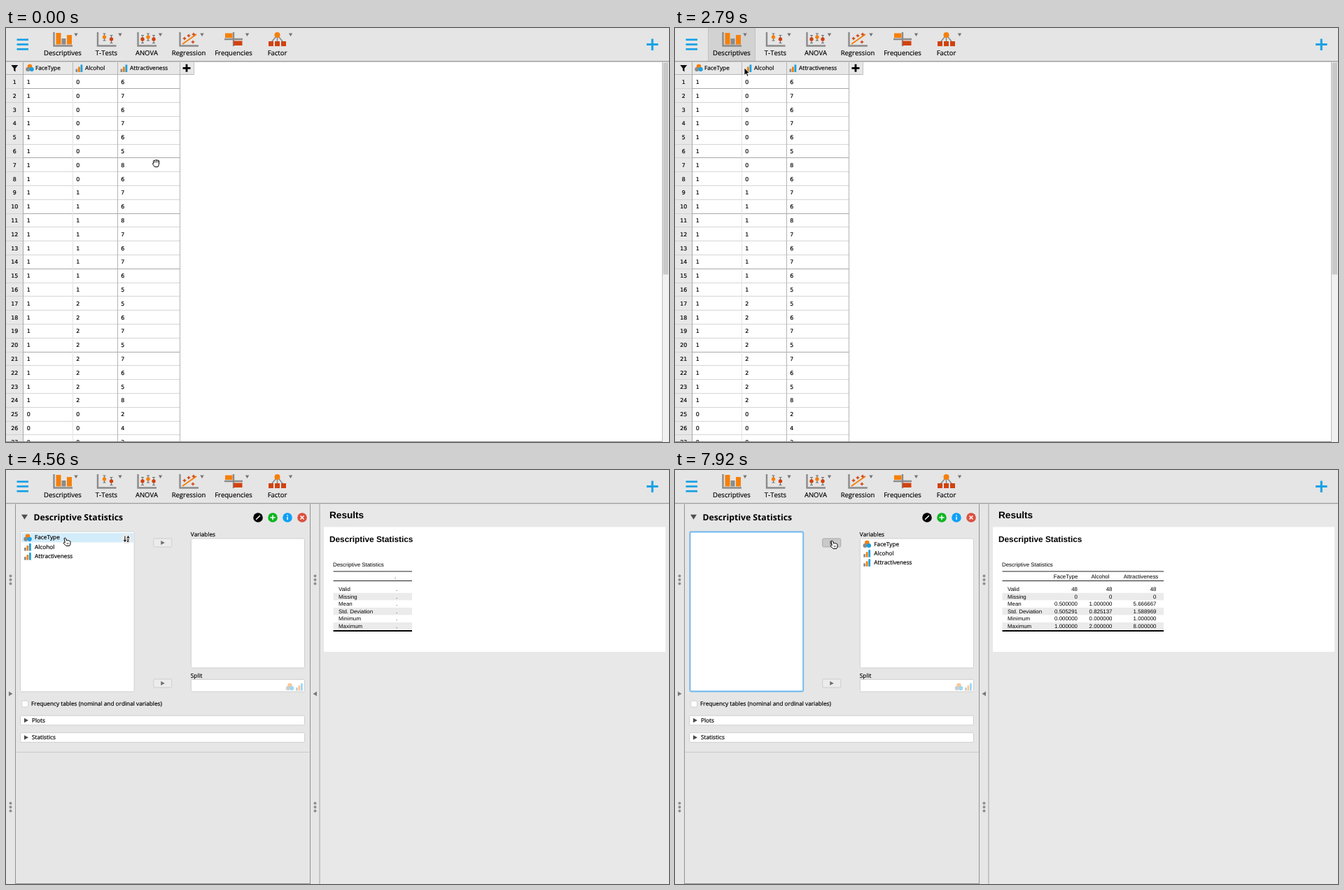
Recreate the animation shown at these times as an HTML page. Size 947x592 px, loop 8 s.

```html
<!DOCTYPE html>
<html lang="en">
<head>
<meta charset="utf-8">
<title>Descriptive statistics</title>
<style>
html, body { margin: 0; width: 100%; height: 100%; overflow: hidden; background: #fff; }
svg { display: block; width: 947px; height: 592px; }
text { font: 8.25px "Open Sans", "Noto Sans", sans-serif; font-kerning: none; stroke-width: .18px; text-rendering: geometricPrecision; white-space: pre; }
.tool { font-size: 9.5px; }
.num { font: 7.9px "DejaVu Sans", sans-serif; }
.title { font-size: 12.2px; font-weight: 700; stroke-width: 0; }
.out { font: 7.9px "Liberation Sans", Arial, sans-serif; stroke-width: 0; }
.out.h1 { font-size: 13.6px; font-weight: 700; }
.out.h2 { font-size: 11.8px; font-weight: 700; }
.sort { font-size: 5px; font-weight: 700; }
</style>
</head>
<body>
<svg viewBox="0 0 947 592">
  <g id="sheet"></g>
  <g id="results"></g>
  <g id="panel"></g>
  <g id="bar"></g>
  <g id="cursor"></g>
</svg>
<script>
const LOOP = 8000;
const ORANGE = '#f5800a', RED = '#d1420f', BLUE = '#17a1e6', GREY = '#8b8b8b';

const rect = (x, y, w, h, fill, more = '') =>
  `<rect x="${x}" y="${y}" width="${w}" height="${h}" fill="${fill}" ${more}/>`;
const line = (x1, y1, x2, y2, color, width = 1) =>
  `<path d="M${x1} ${y1}L${x2} ${y2}" stroke="${color}" stroke-width="${width}"/>`;
const path = (d, fill, more = '') => `<path d="${d}" fill="${fill}" ${more}/>`;
const stroke = (d, color, width) => path(d, 'none', `stroke="${color}" stroke-width="${width}"`);
const dot = (x, y, r, fill) => `<circle cx="${x}" cy="${y}" r="${r}" fill="${fill}"/>`;
const text = (x, y, s, cls = '', anchor = 'start', color = '#000') =>
  `<text x="${x}" y="${y}" class="${cls}" text-anchor="${anchor}" fill="${color}" stroke="${color}">${s}</text>`;
const at = (x, y, body, more = '') => `<g transform="translate(${x} ${y})" ${more}>${body}</g>`;

const layers = {};
function put(id, html) {
  if (layers[id] === html) return;
  layers[id] = html;
  document.getElementById(id).innerHTML = html;
}

// Interpolation through [time, value] pairs
function track(t, keys, ease = k => k) {
  if (t <= keys[0][0]) return keys[0][1];
  for (let i = 1; i < keys.length; i++) {
    const [a, u] = keys[i - 1], [b, v] = keys[i];
    if (t < b) return u + (v - u) * ease((t - a) / (b - a));
  }
  return keys[keys.length - 1][1];
}
const smooth = k => k * k * (3 - 2 * k);

const nominal = dot(0, -2, 3.3, ORANGE) + dot(-2.7, 2, 3.1, GREY) + dot(2.7, 2, 3.1, BLUE);
const ordinal = rect(-5, 1, 2.8, 4.5, GREY) + rect(-1.5, -2, 2.8, 7.5, ORANGE) + rect(2, -5, 2.8, 10.5, BLUE);
const variables = [['FaceType', nominal], ['Alcohol', ordinal], ['Attractiveness', ordinal]];

// ---- toolbar ----
const axes = stroke('M-12.5 -10V9.5H14', GREY, 2.4);
const whisker = (x, y, len, color) =>
  stroke(`M${x} ${y - len}V${y + len}M${x - 2} ${y - len}h4M${x - 2} ${y + len}h4`, '#6d6d6d', 1.1) + dot(x, y, 2.7, color);
const cross = (x, y) => stroke(`M${x - 2.3} ${y}h4.6M${x} ${y - 2.3}v4.6`, RED, 1.4);

const tools = [
  ['Descriptives', 81, 100, axes + rect(-9.5, -9, 7, 16.5, ORANGE) + rect(-1.5, -1, 6, 8.5, GREY) + rect(6, -6, 7, 13.5, ORANGE)],
  ['T-Tests', 143.5, 163, axes + whisker(-3, -3, 5, ORANGE) + whisker(7, 0, 5.5, RED)],
  ['ANOVA', 201, 220.5, axes + whisker(-6, 0, 5.5, RED) + whisker(2, -3, 5, ORANGE) + whisker(10, 0, 5.5, RED)],
  ['Regression', 261, 280, axes + line(-9, 7, 11, -7, ORANGE, 2) + cross(-6, -1) + cross(0, -5) + cross(7, -7) + cross(6, 4)],
  ['Frequencies', 325, 344.5, stroke('M0 -10V10M-13 0H13', GREY, 2.4) + rect(-12, -8.5, 10.5, 6.5, ORANGE) + rect(0, 2.5, 12.5, 6.5, RED)],
  ['Factor', 387.5, 406.5, stroke('M0 -6V5M0 -6L-9 5M0 -6L9 5', GREY, 1.6) + dot(0, -6, 4, ORANGE) +
    [-12.5, -3.5, 5.5].map(x => rect(x, 3, 7, 7, RED)).join('')]
];

function drawBar(hover) {
  let s = rect(0, 0, 947, 47.5, '#e5e5e5');
  if (hover) s += rect(47.5, 0, 67, 47, '#d2d2d2') + line(47.5, 0, 47.5, 47, '#c2c2c2') + line(114.5, 0, 114.5, 47, '#c2c2c2');
  s += line(0, 47.5, 947, 47.5, '#9f9f9f') + line(0, 48.5, 947, 48.5, '#cfcfcf');
  for (const y of [16.7, 23.5, 30.3]) s += line(15.5, y, 32, y, BLUE, 2.7);
  s += stroke('M915 23.6h16.5M923.2 15.4v16.5', BLUE, 3);
  for (const [name, x, arrow, icon] of tools) {
    s += at(x, 16, icon) + text(x, 38.5, name, 'tool', 'middle');
    s += path(`M${arrow - 2.7} 7.5h5.4l-2.7 4.5z`, '#747474');
  }
  return s;
}

// ---- data sheet ----
function drawSheet() {
  const scores = '676765867687676556757658243', step = 19.8;
  const strong = [1, 6, 10, 14, 20];
  let s = rect(0, 48, 947, 544, '#fff') + rect(0, 48, 269, 19, '#e8e8e8') + rect(0, 48, 25, 544, '#e8e8e8');
  for (let r = 1; r <= 27; r++) {
    const base = 60.1 + r * step, edge = Math.floor(67 + r * step) + 0.5;
    s += line(0, edge, 25, edge, '#d0d0d0') + line(25, edge, 248, edge, strong.includes(r) ? '#a9a9a9' : '#d6d6d6');
    s += text(12.3, base, r, 'num', 'middle') + text(29.8, base, r < 25 ? 1 : 0, 'num');
    s += text(100.3, base, Math.floor((r - 1) / 8) % 3, 'num') + text(164.3, base, scores[r - 1], 'num');
  }
  s += line(0, 66.5, 269, 66.5, '#b5b5b5') + line(24.5, 48, 24.5, 592, '#a9a9a9');
  s += line(95.5, 67, 95.5, 592, '#e4e4e4') + line(95.5, 48, 95.5, 67, '#bbb');
  s += line(159.5, 48, 159.5, 592, '#b4b4b4') + line(248.5, 48, 248.5, 592, '#b4b4b4') + line(268.5, 48, 268.5, 67, '#c4c4c4');
  s += path('M7.3 53h10l-3.8 4.8v4.7l-2.4-1.7v-3z', '#111');
  s += at(34, 57, nominal) + at(104.5, 57.5, ordinal) + at(168.5, 57.5, ordinal);
  [42, 113, 177].forEach((x, i) => s += text(x, 60, variables[i][0]));
  s += stroke('M252.5 57.3h11M258 51.8v11', '#000', 2.8);
  s += rect(937, 48, 10, 544, '#f1f1f1') + line(937.5, 48, 937.5, 592, '#bdbdbd') + rect(938.5, 49.5, 7.5, 303, '#c9c9c9');
  return s + line(0, 591.5, 937, 591.5, '#8f8f8f');
}

// ---- analysis panel ----
function grips(x, dir) {
  let s = '';
  for (const c of [157, 482])
    for (const d of [-5.5, 0, 5.5]) s += dot(x, c + d, 2, '#8f8f8f');
  return s + path(`M${x - 2.5 * dir} 316.8v6.4l${5.5 * dir} -3.2z`, '#777');
}

function items(list, x, y, right, hover, selected) {
  return list.map(([name, icon], i) => {
    const cy = y + i * 13.2, on = selected && i === 0;
    let s = '';
    if (i === 0 && (on || hover)) s += rect(x + 1, cy - 6.6, right - x - 2, 13.2, on ? '#0a66d6' : '#d2ecfa');
    return s + at(x + 10, cy, icon) + text(x + 20, cy + 2.6, name, '', 'start', on ? '#fff' : '#000');
  }).join('');
}

function moveButton(x, y, hot) {
  return rect(x - 13, y - 6, 26, 12, hot ? '#c9c9c9' : '#ececec', `rx="1.5" stroke="${hot ? '#a9a9a9' : '#cdcdcd'}"`) +
    path(`M${x - 2.5} ${y - 3}v6l5.5 -3z`, '#707070');
}

function drawPanel(p) {
  const { w, h, moved } = p, right = w - 8.5, span = right - 21;
  const listEnd = 21 + span * 0.4, boxX = 21 + span * 0.6, mid = 21 + span / 2;
  const box = (x, y, x2, y2) => rect(x, y, x2 - x, y2 - y, '#fff', 'rx="1.5" stroke="#cfcfcf"');

  let form = box(20.5, 88, listEnd, 317);
  form += items(variables.slice(moved), 21, 96.8, listEnd, p.hover, p.selected);
  if (p.selected) form += rect(21.5, 88.5, listEnd - 21.5, 228, 'none', 'rx="1.5" stroke="#6cb9f2" stroke-width="1.8"');
  if (moved < 3) {
    const x = listEnd - 11;
    form += dot(x, 98.5, 7.3, '#ececec') + stroke(`M${x - 2.3} 94.5v7.5m-1.8 -2l1.8 2.2l1.8 -2.2`, '#111', 1.1) +
      text(x + 0.5, 98.3, 'A', 'sort') + text(x + 0.5, 103, 'Z', 'sort');
  }
  form += moveButton(mid, 104, p.hot) + moveButton(mid, 305, false);
  form += text(boxX - 0.5, 95, 'Variables') + box(boxX, 98, right, 283);
  form += items(variables.slice(0, moved), boxX, 106, right, false, false);
  form += text(boxX - 0.5, 296.5, 'Split') + box(boxX, 299.5, right, 317);
  form += at(right - 21, 310, nominal, 'opacity=".42"') + at(right - 7.5, 310, ordinal, 'opacity=".42"');
  form += rect(22.7, 330, 9, 9, '#fff', 'rx="2" stroke="#cfcfcf"');
  form += text(36, 337.4, 'Frequency tables (nominal and ordinal variables)');
  [['Plots', 358], ['Statistics', 382.5]].forEach(([name, y]) => {
    form += box(20.5, y - 6.8, right, y + 6.8) + path(`M26 ${y - 3.2}v6.4l6 -3.2z`, '#4a4a4a') + text(37, y + 2.8, name);
  });

  let s = rect(0, 48, w + 13.5, 544, '#e6e6e6');
  s += line(13.5, 48, 13.5, 592, '#929292') + line(w - 0.5, 48, w - 0.5, 592, '#929292') + line(w + 13, 48, w + 13, 592, '#a3a3a3');
  s += line(13, 591.5, w, 591.5, '#929292') + grips(6.5, 1) + grips(w + 6.5, -1);
  s += `<clipPath id="fold"><rect x="14" y="84" width="${w - 15}" height="${Math.max(0, h - 84)}"/></clipPath>`;
  s += `<g clip-path="url(#fold)">${form}</g>` + line(14, h, w - 1, h, '#cbcbcb');
  s += `<g transform="translate(26.5 67) rotate(${p.turn})">${path('M-4.5 3.3h9l-4.5 -7z', '#505050')}</g>`;
  s += text(39.5, 72.2, 'Descriptive Statistics', 'title');

  const marks = [
    ['#000', 'M-2.8 2.8L2.8 -2.8'], ['#0cb51f', 'M-3.6 0h7.2M0 -3.6v7.2'],
    ['#0fa0f7', 'M0 -1v4.3M0 -3.8v1.5'], ['#dc5040', 'M-2.5 -2.5l5 5M2.5 -2.5l-5 5']
  ];
  marks.forEach(([fill, d], i) => s += at(w - 75 + i * 21, 68, dot(0, 0, 6.8, fill) + stroke(d, '#fff', 1.5)));
  return s;
}

// ---- output ----
const stats = [
  ['Valid', '48', '48', '48'], ['Missing', '0', '0', '0'],
  ['Mean', '0.500000', '1.000000', '5.666667'],
  ['Std. Deviation', '0.505291', '0.825137', '1.588969'],
  ['Minimum', '0.000000', '0.000000', '1.000000'],
  ['Maximum', '1.000000', '2.000000', '8.000000']
];

function drawResults(t, w, cols) {
  if (t < 3270) return rect(w + 13, 48, 947, 544, '#e8e8e8') + rect(w + 13.5, 53.5, 947, 539, '#fff');
  let s = rect(440, 48, 507, 544, '#e8e8e8');
  if (t < 3600) return s;
  const end = [580, 586, 635, 698][cols];
  s += text(462, 69, 'Results', 'out h1') + rect(454, 81.5, 488, 178.5, '#fff');
  s += text(462, 102.8, 'Descriptive Statistics', 'out h2') + text(467, 138.3, 'Descriptive Statistics', 'out');
  s += line(467.5, 145, end, 145, '#222') + line(467.5, 158.5, end, 158.5, '#222');
  stats.forEach(([name, ...vals], i) => {
    const y = 173.2 + i * 10.55;
    if (i % 2) s += rect(467.5, y - 8, end - 467.5, 10.5, '#ebebeb');
    s += text(475, y, name, 'out');
    if (!cols) s += text(558, y, '.', 'out', 'middle');
    for (let c = 0; c < cols; c++) s += text([575, 624.5, 687.5][c], y, vals[c], 'out', 'end');
  });
  if (!cols) s += text(556, 155.2, '.', 'out', 'middle');
  for (let c = 0; c < cols; c++) s += text([558, 607.5, 665.5][c], 155.2, variables[c][0], 'out', 'middle');
  return s + line(467.5, 230, end, 230, '#000', 1.8);
}

// ---- pointer ----
const shapes = {
  arrow: path('M0 0V10.5L2.5 8.3L4.2 12.2L6 11.4L4.3 7.6H7.6Z', '#000', 'stroke="#fff" stroke-width=".8"'),
  finger: path('M-1 .8Q.3 -.8 1.5 .9L2.6 4Q4 3 4.8 4Q6 3.3 6.6 4.5Q7.8 4.2 8 5.6L8 9L6.7 11.5H1.8L-1.8 7.8Q-2 6.3 -.1 6.6L.3 6.8Z', '#fff', 'stroke="#000" stroke-width="1" stroke-linejoin="round"') +
    stroke('M3.3 7v2.5M5 7v2.5', '#000', .6),
  palm: path('M-3.6 1.6Q-3.3 -.4 -1.6 .5Q-.7 -1.2 .7 0Q2 -1.2 3 .6Q5.2 .2 4.8 2.4L4.3 6.5L3 9.6H-1.6L-4.5 5.6Q-4.8 3.8 -3.2 4.6Z', '#fff', 'stroke="#000" stroke-width="1" stroke-linejoin="round"') +
    stroke('M-1.6 .5v3M.7 0v3.5M3 .5v3', '#000', .9)
};
const moveX = [[300, 214], [1080, 152], [1110, 150], [1740, 95], [1950, 95], [2700, 98], [2790, 99], [4080, 99], [4560, 84], [4890, 84], [5400, 154], [5670, 222], [5730, 224]];
const moveY = [[300, 189], [1080, 96], [1110, 94], [1740, 34], [1950, 34], [2700, 54], [2790, 57], [4080, 57], [4560, 97], [4890, 97], [5400, 91.5], [5670, 101.5], [5730, 101]];

const passed = (t, times) => times.filter(x => t >= x).length;

function draw(t) {
  const x = track(t, moveX, smooth), y = track(t, moveY, smooth);
  const open = t >= 3090;
  const w = track(t, [[3090, 365], [3150, 394], [3236, 435]]);
  const hot = t > 5400 && x > 209;
  const overList = open && y > 88 && x < 182;

  put('sheet', open ? '' : layers.sheet || drawSheet());
  put('results', open ? drawResults(t, w, passed(t, [6200, 6960, 7860])) : '');
  put('panel', open ? drawPanel({
    w, hot,
    h: track(t, [[3090, 54], [3150, 197], [3236, 403.5]]),
    turn: track(t, [[3090, 90], [3150, -14], [3236, -180]]),
    moved: passed(t, [5880, 6780, 7650]),
    hover: overList,
    selected: t >= 4890
  }) : '');
  put('bar', drawBar(!open && (t > 1740 || y < 47)));

  const kind = hot || overList ? 'finger' : !open && t < 1740 && y > 67 ? 'palm' : 'arrow';
  put('cursor', at(x.toFixed(2), y.toFixed(2), shapes[kind]));
}

function tick(now) {
  draw(now % LOOP);
  requestAnimationFrame(tick);
}
draw(0);
requestAnimationFrame(tick);
</script>
</body>
</html>
```
